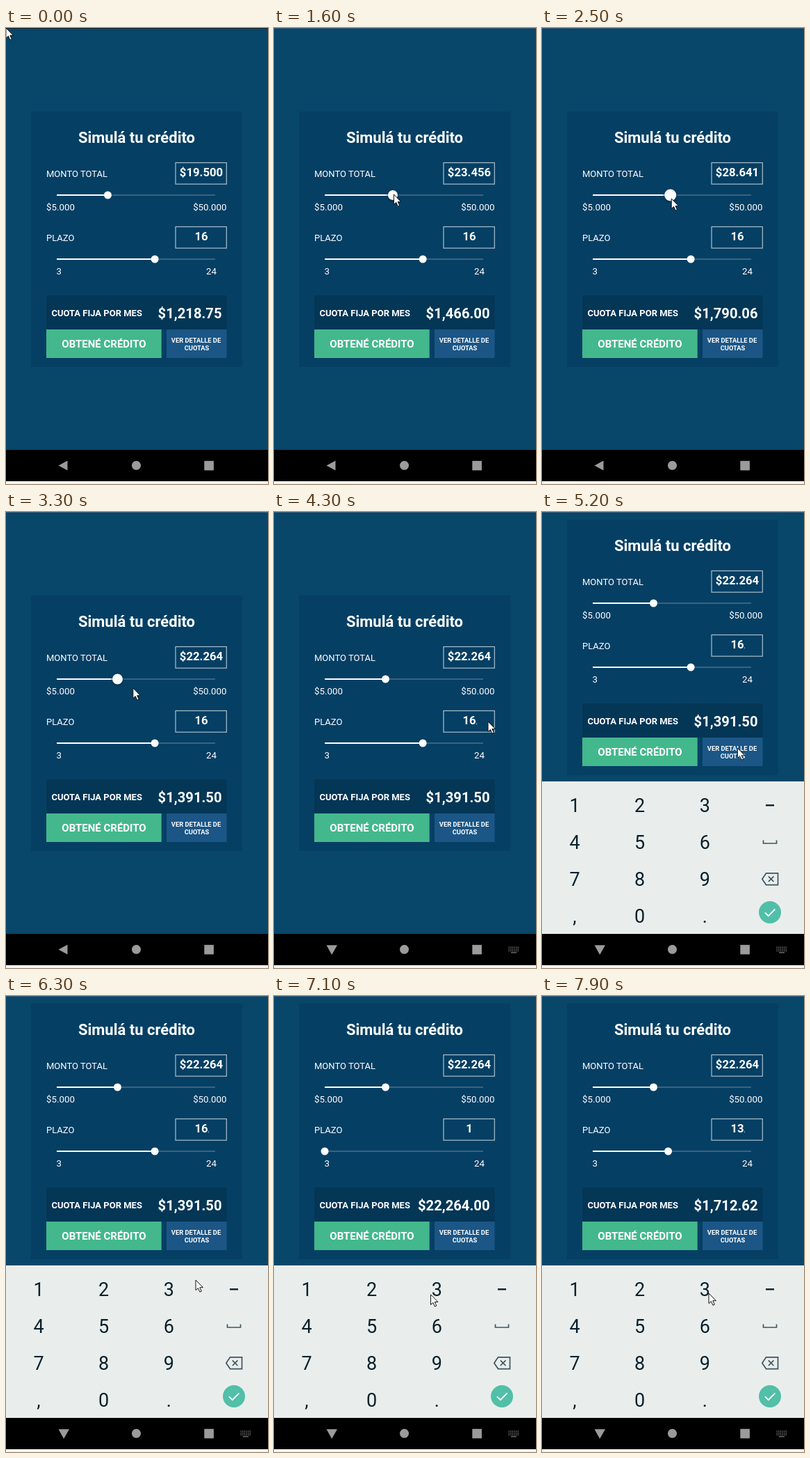
Animation of 377x655 px, one loop 8000 ms. Source, as an HTML page:

```html
<!DOCTYPE html>
<html lang="es">
<head>
<meta charset="utf-8">
<title>Simulador de crédito</title>
<style>
  html, body { margin: 0; width: 100%; height: 100%; overflow: hidden; background: #08466a; }
  svg { display: block; width: 377px; height: 655px; font-family: Roboto, Arial, sans-serif; }
  text { fill: #fff; }
  .bold { font-weight: 700; }
  .mid { text-anchor: middle; }
  .end { text-anchor: end; }
  .label { font-size: 13px; }
  .limit { font-size: 13.3px; }
  .field { font-size: 16.7px; }
  .key { font-size: 27px; fill: #0a202b; }
  .box { fill: none; stroke: #a9bfcd; stroke-width: 1.2; }
  .line { fill: none; stroke: #3d5560; stroke-width: 1.7; }
  .nav { fill: #9b9b9b; }
</style>
</head>
<body>
<svg viewBox="0 0 377 655">
  <defs>
    <filter id="soft" x="-50%" y="-50%" width="200%" height="200%"><feGaussianBlur stdDeviation="1.6"/></filter>
  </defs>
  <rect width="377" height="655" fill="#08466a"/>
  <rect id="status" width="377" height="1"/>

  <g id="card">
    <rect x="36" y="120" width="304" height="367" fill="#063f64"/>
    <text class="bold mid" x="188" y="165" font-size="22">Simulá tu crédito</text>

    <text class="label" x="58" y="214">MONTO TOTAL</text>
    <rect class="box" x="244" y="193.5" width="73.3" height="30.7"/>
    <text class="bold mid field" id="amount" x="281" y="213"></text>
    <g id="amountSlider"></g>
    <text class="limit" x="58" y="262">$5.000</text>
    <text class="limit end" x="317.5" y="262">$50.000</text>

    <text class="label" x="58" y="306">PLAZO</text>
    <rect class="box" x="244" y="285.5" width="73.3" height="30.7"/>
    <text class="bold mid field" id="term" x="281" y="304.5"></text>
    <rect id="caret" y="303" width="1" height="2.5" fill="#7895a8"/>
    <g id="termSlider"></g>
    <text class="limit" x="72.5" y="354">3</text>
    <text class="limit end" x="303" y="354">24</text>

    <rect x="58" y="384" width="259.5" height="49" fill="#043656"/>
    <text class="bold label" x="65.5" y="414">CUOTA FIJA POR MES</text>
    <text class="bold end" id="quota" x="310.5" y="416.8" font-size="20.2"></text>
    <rect x="58" y="433" width="165.7" height="41" fill="#43b88c"/>
    <text class="bold mid" x="141" y="459.3" font-size="15">OBTENÉ CRÉDITO</text>
    <rect x="231" y="433" width="86.5" height="41" fill="#1b5686"/>
    <g class="bold mid" font-size="9.3">
      <text x="273.5" y="452.2">VER DETALLE DE</text>
      <text x="274.5" y="463">CUOTAS</text>
    </g>
  </g>

  <rect id="sheet" y="387" width="377" height="219" fill="#fdfdf8"/>
  <rect y="606" width="377" height="45" fill="#000"/>
  <rect y="651" width="377" height="4" fill="#f8f3ef"/>

  <path class="nav" id="back" d="M75.5 628.5 88.5 621.5V635.5Z"/>
  <circle class="nav" cx="187.5" cy="628.3" r="6.5"/>
  <rect class="nav" x="285.3" y="621.8" width="13.6" height="13.6"/>
  <g class="nav" id="open">
    <path d="M75.5 622.3H91L83.2 636Z"/>
    <g id="dots" opacity=".8"></g>
  </g>

  <g id="pad">
    <rect y="387" width="377" height="219" fill="#e9eeec"/>
    <g id="keys"></g>
    <path d="M322 421.3H334" stroke="#0a202b" stroke-width="2.4"/>
    <path class="line" d="M318.5 471.5V476H337.5V471.5"/>
    <path class="line" d="M322.5 518.8H339.5V535.6H322.5L316.8 527.2ZM325.8 523.4 333.4 531M333.4 523.4 325.8 531"/>
    <circle cx="328" cy="575" r="16" fill="#52bfa8"/>
    <path d="M320.8 575.3 325.8 580.2 335.4 570.3" fill="none" stroke="#fff" stroke-width="1.8"/>
  </g>

  <path id="cursor" d="M0 0V14.6L3.4 11.5 5.9 17.2 8.3 16.1 5.8 10.7H10.4Z" fill="#fff" stroke="#111"/>
</svg>

<script>
const LOOP = 8000, STEP = 100;
const TRACK_X = 73, TRACK_W = 228;
const GRAB = 1400, RELEASE = 3200;
const PEAK = 31830, FINAL = 22264;

// Straight cursor moves: start, end, x, y.
const MOVES = [
  [0, 1, 139, 235], [600, 1300, 148, 237],
  [RELEASE, 3900, 308, 301], [4300, 4700, 300, 303], [5100, 5400, 244, 411],
  [5500, 6300, 273, 408], [6600, 7200, 216, 433], [7300, 7400, 240, 427]
];

const $ = id => document.getElementById(id);
const show = (id, on) => { $(id).style.display = on ? '' : 'none'; };
const move = (id, x, y) => $(id).setAttribute('transform', `translate(${x} ${y})`);
const ramp = (t, a, b) => Math.min(1, Math.max(0, (t - a) / (b - a)));
const smooth = u => u * u * (3 - 2 * u);
const mix = (a, b, u) => a + (b - a) * u;
const knobX = part => TRACK_X + TRACK_W * part;
const amountPart = amount => (amount - 5000) / 45000;

// The drag starts with a jump, eases up to the peak and runs evenly back.
function amountAt(t) {
  if (t <= GRAB) return 19500;
  if (t < 2200) return mix(23456, PEAK, smooth(ramp(t, 1500, 2000)));
  return mix(PEAK, FINAL, ramp(t, 2200, 2800));
}

function cursorAt(t) {
  if (t > GRAB && t <= RELEASE) {
    return [knobX(amountPart(amountAt(t))) + 1.5, mix(238, 245, ramp(t, 1500, 2200))];
  }
  let pos = [0, 0];
  for (const [a, b, x, y] of MOVES) {
    if (t < a) break;
    if (a === RELEASE) pos = cursorAt(RELEASE);
    const u = ramp(t, a, b);
    pos = [mix(pos[0], x, u), mix(pos[1], y, u)];
  }
  return pos;
}

function slider(id, y) {
  $(id).innerHTML =
    `<rect x="${TRACK_X}" y="${y - 0.8}" width="${TRACK_W}" height="1.6" fill="#496d87"/>
     <rect x="${TRACK_X}" y="${y - 1}" height="2" fill="#fff"/>
     <circle cy="${y + 1}" fill="#012a45" opacity=".65" filter="url(#soft)"/>
     <circle cy="${y}" fill="#fff"/>`;
  const [, fill, shade, knob] = $(id).children;
  return (part, grip) => {
    const x = knobX(part), r = 5.5 + 3 * grip;
    fill.setAttribute('width', x - TRACK_X);
    for (const c of [shade, knob]) c.setAttribute('cx', x);
    knob.setAttribute('r', r);
    shade.setAttribute('r', grip ? r + 1 : 0);
  };
}

const setAmount = slider('amountSlider', 240);
const setTerm = slider('termSlider', 332);

['123', '456', '789', ',0.'].forEach((row, j) => [...row].forEach((c, i) => {
  $('keys').innerHTML += `<text class="key mid" x="${47 + i * 93.7}" y="${430.5 + j * 53.2}">${c}</text>`;
}));

for (let n = 0; n < 18; n++) {
  const x = 337.5 + n % 6 * 2.6, y = 624.5 + Math.floor(n / 6) * 2.6;
  $('dots').innerHTML += `<rect x="${x}" y="${y}" width="1.4" height="1.4"/>`;
}
$('dots').innerHTML += '<rect x="341" y="632.2" width="8" height="1.3"/>';

function draw(t) {
  const typing = t >= 4200, raised = t >= 4400;
  $('status').setAttribute('fill', t < 1100 ? '#1b2226' : '#3a5f78');
  move('card', 0, raised ? -109 : 0);

  // The printed amount trails the knob by one step until release.
  const shown = Math.round(t <= RELEASE ? amountAt(Math.min(t - STEP, 2700)) : FINAL);
  $('amount').textContent = '$' + shown.toLocaleString('en-US').replace(',', '.');
  setAmount(amountPart(amountAt(t)), ramp(t, GRAB, 1800) - ramp(t, RELEASE, 3500));

  const termAt = entered => t < 6800 ? 16 : t < entered ? 1 : 13;
  const typed = termAt(7700), term = termAt(7900);
  $('term').textContent = typed;
  setTerm((Math.max(term, 3) - 3) / 21, 0);
  $('quota').textContent = '$' + (shown / term).toLocaleString('en-US',
    { minimumFractionDigits: 2, maximumFractionDigits: 2 });

  const blink = Math.floor((t - 4200) / 500) % 2 === 0;
  show('caret', typing && (blink || t >= 7700));
  $('caret').setAttribute('x', typed === 1 ? 286 : 291);

  show('back', !typing);
  show('open', typing);
  show('sheet', raised);
  show('pad', raised);
  const hidden = (1 - ramp(t, 4300, 4700)) ** 3;
  move('pad', 0, 35.5 * hidden);
  $('pad').setAttribute('opacity', 1 - 0.56 * hidden);

  move('cursor', ...cursorAt(t));
}

const start = performance.now();
function tick() {
  const t = (performance.now() - start) % LOOP;
  draw(Math.floor(t / STEP) * STEP);
  requestAnimationFrame(tick);
}
tick();
</script>
</body>
</html>
```
